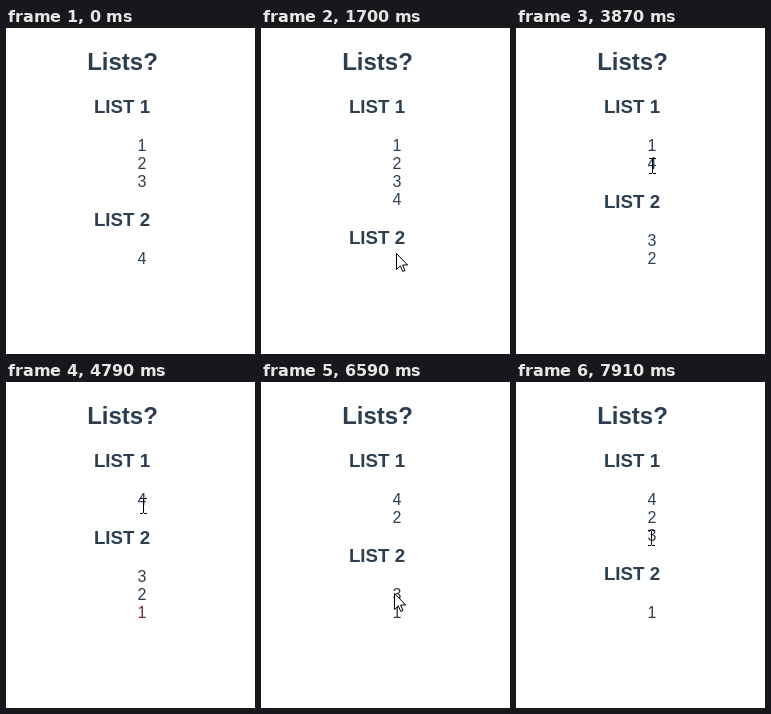
Animation of 249x326 px, one loop 7.99 s. Source, as an HTML page:

```html
<!DOCTYPE html>
<html lang="en">
<head>
<meta charset="utf-8">
<title>Lists</title>
<style>
  html, body { margin: 0; height: 100%; overflow: hidden; background: #fff; }
  svg { display: block; width: 100vw; height: 100vh; }
  text { font: 16px "Liberation Sans", Arial, sans-serif; fill: #2c3e50; text-anchor: middle; }
  .title { font-size: 24px; font-weight: bold; }
  .heading { font-size: 18.72px; font-weight: bold; }
</style>
</head>
<body>
<svg viewBox="0 0 249 326">
  <text class="title" x="116.5" y="42">Lists?</text>
  <text class="heading" x="116" y="85">LIST 1</text>
  <text class="heading" x="116" id="heading2">LIST 2</text>
  <g id="items"></g>
  <g id="cursor" stroke="#000" stroke-linejoin="round">
    <circle id="ring" r="11" fill="none"/>
    <path id="arrow" d="M.5 .5V16.5L4.3 12.9L6.8 18.5L9 17.5L6.6 12H11.7Z" fill="#fff"/>
    <path id="beam" d="M-1 -7.5H2M3 -7.5H6M2.5 -7V7M-1 7.5H2M3 7.5H6" fill="none"/>
  </g>
</svg>
<script>
const LOOP = 7990, STEP = 80, ROW = 18;
const $ = id => document.getElementById(id);

// Pointer moves: first step, last step, x, y, shape
const moves = [
  [350, 350, 197, 310, 'arrow'],
  [430, 430, 167, 192, 'arrow'],
  [670, 910, 122, 216, 'arrow'],
  [1070, 1150, 125, 222, 'arrow'],
  [1210, 1210, 133, 226, 'beam'],
  [1370, 1370, 134, 226, 'beam'],
  [1530, 1530, 135, 225, 'beam'],
  [1700, 1700, 135, 225, 'arrow'],
  [1990, 2390, 149, 140, 'arrow'],
  [2690, 2690, 136, 143, 'beam'],
  [2770, 2850, 136, 150, 'beam'],
  [3470, 3710, 134, 138, 'beam'],
  [3950, 4250, 134, 122, 'beam'],
  [4790, 4870, 135, 126, 'beam'],
  [5110, 5110, 135, 122, 'beam'],
  [5270, 5510, 141, 160, 'arrow'],
  [5590, 5810, 131, 199, 'arrow'],
  [5890, 5970, 129, 209, 'arrow'],
  [6590, 6830, 146, 216, 'arrow'],
  [6910, 7210, 129, 214, 'arrow'],
  [7290, 7370, 129, 211, 'arrow'],
  [7590, 7750, 134, 161, 'beam'],
  [7910, 7910, 133, 156, 'beam']
];

// Clicks: press, release, item that changes list on release
const clicks = [
  [1530, 1700, 4], [3010, 3170, 3], [3710, 3870, 2],
  [4410, 4570, 1], [6130, 6270, 2], [7370, 7530, 3]
];

const items = [1, 2, 3, 4].map(n => {
  const el = document.createElementNS('http://www.w3.org/2000/svg', 'text');
  el.textContent = n;
  el.setAttribute('x', 136);
  $('items').append(el);
  return el;
});

function drawLists(t) {
  let lists = [[1, 2, 3], [4]];
  for (const [, release, item] of clicks) {
    if (t < release) break;
    lists = lists.map(list => list.includes(item) ? list.filter(n => n !== item) : [...list, item]);
  }
  const shift = 59 + ROW * lists[0].length;
  $('heading2').setAttribute('y', 85 + shift);
  lists.forEach((list, i) => list.forEach((n, row) =>
    items[n - 1].setAttribute('y', 123 + i * shift + row * ROW)));
  items[0].style.fill = t >= 4570 && t < 6590 ? '#702c38' : '';
}

function drawCursor(t) {
  const i = moves.findLastIndex(move => t >= move[0]);
  $('cursor').style.display = i < 0 ? 'none' : '';
  if (i < 0) return;
  const [start, end, x, y, shape] = moves[i];
  const [, , fromX, fromY] = moves[i - 1] || moves[i];
  const gaps = Math.round((end - start) / STEP);
  const done = gaps ? Math.floor((t - start) / (end - start) * gaps + 1e-6) : 0;
  const p = Math.min(1, (done + 1) / (gaps + 1));
  const at = (a, b) => Math.round(a + (b - a) * p);
  $('cursor').setAttribute('transform', `translate(${at(fromX, x)} ${at(fromY, y)})`);
  for (const id of ['arrow', 'beam']) $(id).style.display = id === shape ? '' : 'none';
  const pressed = clicks.some(([press, release]) => t >= press && t < release);
  $('ring').style.display = pressed ? '' : 'none';
}

function draw() {
  const t = performance.now() % LOOP;
  drawLists(t);
  drawCursor(t);
  requestAnimationFrame(draw);
}
draw();
</script>
</body>
</html>
```
